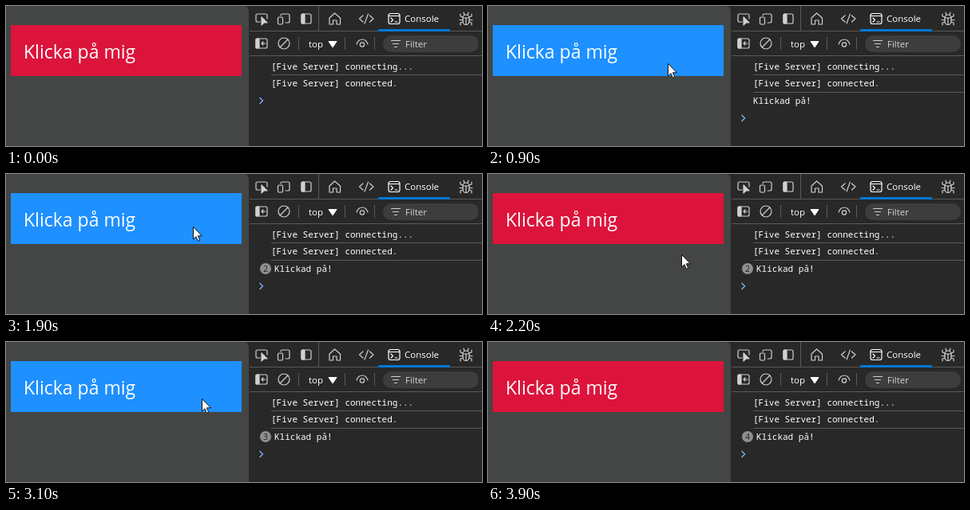
These frames come from a looping animation (596x176 px, 4.4 s). An HTML page:

```html
<!DOCTYPE html>
<html lang="sv">
<head>
<meta charset="utf-8">
<style>
html, body { margin: 0; width: 100%; height: 100%; overflow: hidden; background: #282828; }
svg { display: block; }
text { font: 11.5px "Open Sans", "Noto Sans", sans-serif; fill: #fff; }
.log text { font: 500 11px "Noto Sans Mono", monospace; white-space: pre; }
.icons { fill: none; stroke: #d0d0d0; stroke-width: 1.2; stroke-linecap: round; stroke-linejoin: round; }
.solid { fill: #d0d0d0; }
.lines { fill: none; stroke: #5a5a5a; }
</style>
</head>
<body>
<svg width="596" height="176" viewBox="0 0 596 176">
  <!-- page -->
  <path d="M0 0H298Q304 0 304 8V176H0Z" fill="#444645"/>
  <rect id="button" x="6" y="24" width="289" height="64"/>
  <text x="22" y="66" style="font-size:23px">Klicka på mig</text>

  <!-- tool rows -->
  <path class="lines" d="M305 31.5H596M305 62.5H596M391.5 0V31M366.5 39V55M424.5 39V55M461.5 39V55M332 86.5H596"/>
  <rect x="466" y="29" width="90" height="3" rx="1" fill="#0078d4"/>
  <rect x="472" y="37" width="120" height="21" rx="10.5" fill="#3d3d3d"/>
  <g class="icons">
    <!-- inspect, devices, dock -->
    <path d="M318 20H315Q313 20 313 18V12Q313 10 315 10H325Q327 10 327 12V16"/>
    <path class="solid" d="M320 14V24L323 21H327Z"/>
    <path d="M344 12Q344 10 346 10H353Q355 10 355 12V19Q355 21 353 21H350"/>
    <rect x="340.5" y="14" width="6" height="9" rx="1.5"/>
    <rect x="370" y="10" width="12" height="12" rx="2"/>
    <rect class="solid" x="370" y="10" width="4" height="12" rx="1"/>
    <!-- home, code, console -->
    <path d="M405 15L411.500 9L418.500 15V23H414V18H409.500V23H405Z"/>
    <path d="M447 12L442.500 16L447 20M455.500 12L460 16L455.500 20M453.500 10L449 22"/>
    <g stroke="#fff">
      <rect x="479" y="9.500" width="14" height="13" rx="2.500"/>
      <path d="M479 12.500H493M482 15L484.500 17.500L482 20M487 20H490"/>
    </g>
    <!-- bug: body and one side of legs, mirrored -->
    <rect x="572" y="11" width="8" height="12.500" rx="4"/>
    <path d="M572 15H580M576 15V23"/>
    <g id="legs"><path d="M574 11L573 8M572 14L569 13V10M572 17.500H568M572 20L569 21V24"/></g>
    <use href="#legs" transform="translate(1152 0) scale(-1 1)"/>
    <!-- sidebar, clear, eye, filter -->
    <rect x="313" y="41" width="14" height="12" rx="2"/>
    <rect class="solid" x="313" y="41" width="4" height="12" rx="1"/>
    <path d="M325 47H320M322 45L320 47L322 49"/>
    <circle cx="348" cy="47" r="7"/>
    <path d="M343 52L353 42M439 48Q441 42 446 42T453 48"/>
    <circle cx="446" cy="48.500" r="2.700"/>
    <path d="M482.500 43.500H493.500M484.500 47.500H491.500M486.500 51.500H489.500"/>
  </g>
  <path d="M404 44.500H414L409 52Z" fill="#fff" stroke="#fff" stroke-linejoin="round"/>
  <text x="499" y="20">Console</text>
  <text x="379" y="52" style="font-weight:500">top</text>
  <text x="500" y="52" style="fill:#d5d5d5">Filter</text>

  <!-- console -->
  <g class="log">
    <text x="332" y="80">[Five Server] connecting...</text>
    <text x="332" y="101">[Five Server] connected.</text>
    <g id="entry">
      <path class="lines" d="M332 108.5H596"/>
      <text id="message" y="123">Klickad på!</text>
    </g>
  </g>
  <g id="badge">
    <circle cx="325" cy="119" r="7" fill="#8f8f8f"/>
    <text id="count" x="325" y="122.700" text-anchor="middle" style="font-size:10px;fill:#202020"></text>
  </g>
  <path id="prompt" d="M317.500 -4L321.500 0L317.500 4" fill="none" stroke="#7cacf8" stroke-width="1.4"/>

  <path id="cursor" d="M.5 .5V16L4 12.700L6.300 18.300L8.700 17.300L6.400 11.800H11.300Z" fill="#fff" stroke="#111"/>
</svg>
<script>
const $ = id => document.getElementById(id);
const loop = 4400, step = 100;
const clicks = [900, 1800, 2600, 3400];

const linear = k => k;
const easeIn = k => k ** 3;
const easeOut = k => 1 - (1 - k) ** 3;

// pointer moves: sideways easing, and how far the path bows right and down
const moves = [
  { start: 100, end: 600, from: [441, 114], to: [225, 72], ease: easeOut },
  { start: 1100, end: 1600, from: [225, 72], to: [234, 66], bow: [13, 35] },
  { start: 1900, end: 2300, from: [234, 66], to: [245, 81], bow: [0, 34] },
  { start: 2700, end: 3100, from: [245, 81], to: [245, 71], bow: [0, 39] },
  { start: 3400, end: 3800, from: [245, 71], to: [549, 122], ease: easeIn }
];

function pointer(t) {
  const move = moves.filter(m => m.start <= t).pop();
  if (!move || t > 3800) return null;
  const { start, end, from, to, ease = linear, bow = [0, 0] } = move;
  const k = Math.min(1, (t - start) / (end - start));
  return [ease(k), k].map((e, i) =>
    Math.round(from[i] + (to[i] - from[i]) * e + bow[i] * Math.sin(Math.PI * k)));
}

const show = (id, on) => $(id).setAttribute("visibility", on ? "visible" : "hidden");
const move = (id, x, y) => $(id).setAttribute("transform", `translate(${x} ${y})`);

function draw(now) {
  const t = Math.floor(now % loop / step) * step;
  const n = clicks.filter(c => c <= t).length;
  const at = pointer(t);
  const [x, y] = at || [0, 0];
  const hover = x >= 6 && x < 295 && y >= 24 && y < 88;

  $("button").setAttribute("fill", hover ? "#1e90ff" : "#dc143c");
  show("cursor", at);
  move("cursor", x, y);
  show("entry", n > 0);
  show("badge", n > 1);
  $("message").setAttribute("x", n > 1 ? 336 : 332);
  $("count").textContent = n;
  move("prompt", 0, n ? 141 : 119);
}

const start = performance.now();
function frame(now) {
  draw(Math.max(0, now - start));
  requestAnimationFrame(frame);
}
frame(start);
</script>
</body>
</html>
```
